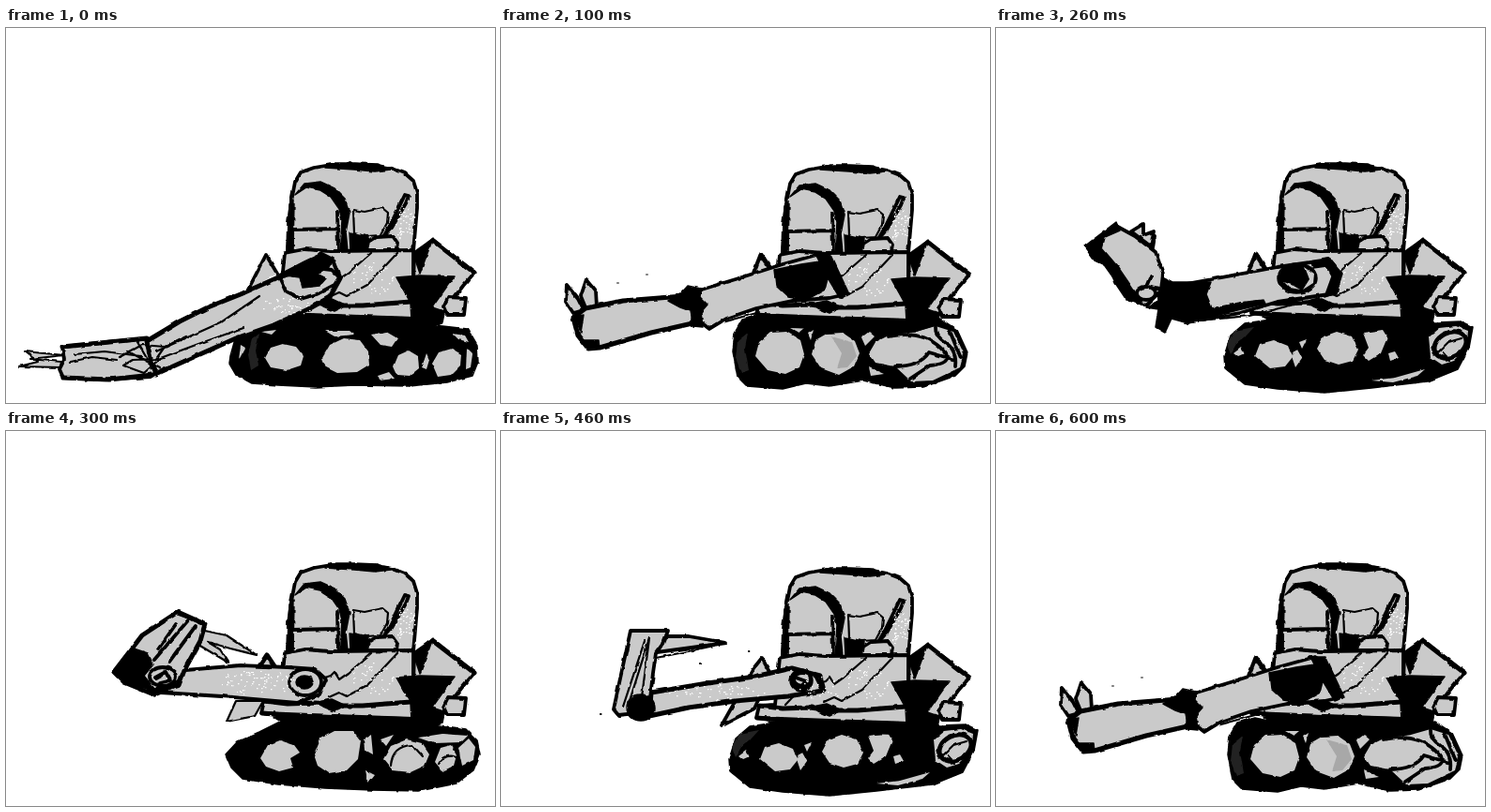
Write an HTML page that moves like this. It is 521 by 400 pixels and loops after 700 ms.

```html
<!DOCTYPE html>
<html lang="en">
<head>
<meta charset="utf-8">
<title>Excavator</title>
<style>
html, body { margin: 0; width: 100%; height: 100%; overflow: hidden; background: #fff; }
svg { display: block; width: 100vw; height: 100vh; }
path, ellipse { stroke: #000; stroke-width: 3.8; stroke-linejoin: round; stroke-linecap: round; fill: none; }
.metal { fill: #cacaca; }
.ink { fill: #000; stroke-width: 1.5; }
.patch { fill: #cacaca; stroke: none; }
.dark { fill: #222; stroke: none; }
.thin { stroke-width: 2.2; }
.bold { stroke-width: 5; }
.specks { fill: #fff; stroke: none; }
</style>
</head>
<body>
<svg viewBox="0 0 521 400">
<filter id="rough" filterUnits="userSpaceOnUse" x="0" y="0" width="521" height="400" color-interpolation-filters="sRGB">
  <feTurbulence type="fractalNoise" baseFrequency=".1" numOctaves="2" seed="4"/>
  <feDisplacementMap in="SourceGraphic" scale="3" xChannelSelector="R" yChannelSelector="G"/>
</filter>
<g filter="url(#rough)">

<g class="track">
  <path class="ink" d="M239 350L244 332 256 320 280 314 430 314 492 321 502 338 503 356 497 371 470 378 430 382 372 381 330 383 290 381 262 379 245 370 238 358Z"/>
  <path class="patch" d="M276 352L282 341 295 337 309 340 317 350 314 360 299 365 282 362Z"/>
  <path class="patch" d="M337 352L345 338 360 331 377 333 386 345 387 359 374 367 353 368 341 362Z"/>
  <path class="patch" d="M413 361L418 349 429 344 439 350 440 363 430 371 417 370Z"/>
  <path class="patch" d="M454 358L461 346 475 342 485 348 484 360 474 370 460 372Z"/>
  <path class="patch" d="M340 323L366 323 371 327 350 329ZM389 327L405 324 417 331 411 340 399 338ZM448 347L451 354 448 364 443 362ZM491 342L497 348 495 362 490 364ZM476 326L489 328 493 335 482 332ZM250 338L255 341 248 354Z"/>
  <path class="patch" d="M272 324L288 322 283 327ZM396 371L408 367 414 374 398 376Z"/>
  <path class="dark" d="M262 332L270 326 266 343 269 360 261 365 258 348Z"/>
</g>

<g class="track">
  <path class="ink" d="M247 345L249 325 257 311 276 306 300 311 440 314 468 310 486 322 497 346 494 361 484 371 450 383 420 384 386 376 350 382 325 379 300 385 262 382 252 372Z"/>
  <path class="patch" d="M271 350L275 335 287 325 304 324 319 333 323 348 318 362 303 369 284 365Z"/>
  <path class="patch" d="M331 348L335 333 347 326 364 325 377 334 382 347 376 361 360 370 341 363Z"/>
  <path class="dark" opacity=".2" d="M352 329L374 335 379 350 369 362 358 363 363 347Z"/>
  <path class="patch" d="M392 347L399 335 413 328 442 324 463 318 482 324 493 347 489 362 460 376 437 377 420 361 399 357Z"/>
  <path class="patch" d="M308 320L323 320 317 325ZM327 326L333 322 330 333ZM384 330L392 324 398 329 388 339ZM392 362L408 369 394 371Z"/>
  <path d="M413 329Q447 322 467 340T457 360L436 374M420 361Q446 361 456 346L484 354M463 319Q462 328 474 336T484 361M478 323L490 352"/>
  <path class="dark" d="M252 334L263 325 260 342 264 365 256 368 250 352Z"/>
</g>

<g class="track">
  <path class="ink" d="M243 350L250 328 265 315 300 310 430 314 470 314 495 313 508 319 504 341 492 364 460 377 400 384 350 389 300 385 265 380 244 363Z"/>
  <path class="patch" d="M276 350L281 337 296 333 311 339 316 351 308 361 292 363Z"/>
  <path class="patch" d="M342 342L349 329 363 324 379 329 386 343 380 355 365 359 350 354Z"/>
  <path class="patch" d="M391 325L412 322 417 330 410 347 397 355 391 349 397 341ZM253 346L261 340 265 347 258 350ZM315 350L321 343 326 352 319 362ZM323 335L331 332 326 342ZM418 347L425 345 429 352 420 355ZM400 376L425 373 457 364 449 371 423 378Z"/>
  <path class="patch" d="M461 329L472 320 490 318 503 323 501 342 488 355 475 359 463 351Z"/>
  <ellipse cx="484" cy="338" rx="18" ry="13" transform="rotate(-28 484 338)" class="bold"/>
  <path class="thin" d="M469 348L482 335 496 331M476 346L483 354"/>
  <path class="dark" d="M246 337L254 323 275 319 265 330 256 337 250 348Z"/>
</g>

<g class="track">
  <path class="ink" d="M234 345L247 331 270 321 296 308 440 311 490 318 502 330 505 345 498 362 480 376 440 384 390 383 340 381 290 377 252 371 240 359Z"/>
  <path class="patch" d="M271 349L279 335 292 330 307 335 313 343 303 349 306 359 291 363 277 358Z"/>
  <path class="patch" d="M328 345L335 328 350 320 370 320 378 330 375 350 363 362 344 365 332 357Z"/>
  <path class="patch" d="M402 350L410 336 427 329 443 333 451 345 446 357 431 364 412 362Z"/>
  <path class="patch" d="M457 353L463 338 474 335 480 346 477 357 465 363ZM482 338L493 328 500 337 498 351 486 357ZM439 327L465 323 492 325 485 332 456 333ZM381 329L389 324 391 345 382 340ZM383 362L393 367 386 376ZM399 329L413 324 405 336Z"/>
  <path class="thin" d="M410 357Q411 336 433 335L444 347M461 355Q468 343 480 348"/>
</g>

<g id="body">
  <path class="ink" d="M285 308L440 311 467 304 465 314 440 322 300 317Z"/>
  <path class="metal" d="M300 238L301 208 304 185 308 164 314 154 328 149 346 146 370 146 397 147 412 150 425 155 434 163 438 176 438 192 436 215 434 238Z"/>
  <path class="ink" d="M340 149L352 144 372 144 395 145 410 151 393 153 371 151Z"/>
  <path class="ink" d="M308 178L318 166 335 164 350 171 361 182 366 197 362 218 364 238 356 238 358 205 355 193 346 180 335 173 320 170ZM302 188L307 183 306 238 299 238Z"/>
  <path d="M305 215L353 214M353 196L354 238"/>
  <path class="ink" d="M366 219L386 222 385 238 367 238Z"/>
  <path class="metal thin" d="M370 194L382 196 401 192 407 197 406 208 399 221 384 222 371 219Z"/>
  <path class="metal" d="M425 178L429 179 426 187 411 213 402 223 409 211Z"/>
  <path class="metal" d="M384 237L386 228 394 223 412 222 417 229 416 237Z"/>
  <path class="metal" d="M297 240L318 236 345 238 434 237 434 310 350 307 272 304 275 291 292 290Z"/>
  <path class="bold" d="M275 291L300 294 330 293 350 296 380 296 431 292M273 304L310 307 440 311"/>
  <path class="ink" d="M332 292L347 289 362 296 350 302 338 297Z"/>
  <path class="thin" d="M303 290L320 272 346 264 350 260 355 268 365 261 389 240M344 287L355 282 363 286 385 274 417 240"/>
  <path class="metal" d="M435 240L455 226 499 261 487 275 465 304 442 316 433 310Z"/>
  <path class="ink" d="M434 241L455 224 441 262ZM416 266L441 264 478 265 471 274 454 298 469 303 442 317 432 312 431 293Z"/>
  <path class="bold" d="M455 227L499 261"/>
  <path class="metal" d="M471 287L490 288 488 306 470 306 466 297Z"/>
  <path class="specks" data-specks="424 209 11 18 45"/>
  <path class="specks" data-specks="388 267 24 18 45"/>
</g>

<g class="arm">
  <path class="metal" d="M258 279L277 242 289 262"/>
  <path class="metal thin" d="M14 361L34 356 20 345 62 349 26 353 59 356 58 362Z"/>
  <path class="metal" d="M60 340L100 336 150 331 162 345 164 364 154 372 100 375 61 373 57 364 62 354Z"/>
  <path class="bold" d="M60 340L100 336 150 331M61 373L110 375 156 370"/>
  <path class="metal bold" d="M150 334L185 313 215 298 250 284 290 266 330 247 349 249 356 267 345 287 322 300 285 317 245 331 200 351 160 369 154 352Z"/>
  <path class="thin" d="M160 345L229 314 270 286M162 353L205 337 253 320M167 341L192 329M121 351L145 338 169 340 160 353 135 354 125 360 147 368 165 352M69 356L92 351 118 354M73 348L105 345 144 350M130 345L164 363M140 335L158 366"/>
  <path class="metal" d="M291 266L298 281 314 289 331 284 350 274 355 266 347 258 330 256Z"/>
  <path class="ink" d="M291 263L318 249 337 240 349 246 344 255 331 262 341 267 334 275 316 277 313 266Z"/>
  <path class="specks" data-specks="300 296 30 9 40"/>
</g>

<g class="arm">
  <path class="metal bold" d="M270 260L277 242 288 258"/>
  <path class="metal" d="M77 304L69 292 70 274 82 289 88 301ZM85 286L91 268 101 280 102 298 90 298Z"/>
  <path class="metal" d="M207 281L250 268 300 252 340 241 353 249 368 284 350 288 310 291 272 299 240 310 222 321 207 309Z"/>
  <path class="metal bold" d="M77 309L90 299 130 291 194 286 207 299 204 315 160 325 105 341 93 342 82 328Z"/>
  <path class="ink" d="M178 291L190 285 199 275 213 278 212 287 220 295 213 303 215 319 205 318 202 302 191 298ZM88 333L104 333 105 342 92 343ZM79 308L88 306 85 325Z"/>
  <path class="ink" d="M291 258L320 252 340 249 349 263 345 279 325 290 306 287 293 275ZM335 241L351 241 371 284 361 288 349 268Z"/>
  <path class="thin" d="M235 314L276 303"/>
  <path class="thin" d="M125 272L126 272M155 263L156 263" stroke-opacity=".5"/>
</g>

<g class="arm">
  <path class="metal bold" d="M270 258L277 241 287 257"/>
  <path class="metal" d="M180 277L230 268 300 255 355 247 367 261 362 283 300 292 260 304 205 314 176 303Z"/>
  <path class="ink" d="M170 262L188 271 229 271 224 284 230 299 260 293 285 290 287 294 245 304 205 315 187 310 180 325 170 319 173 300 160 298 173 291Z"/>
  <path class="ink" d="M336 250L357 247 369 262 362 283 350 287 358 265 352 254 338 256Z"/>
  <ellipse class="ink" cx="321" cy="267" rx="21" ry="16"/>
  <path class="patch" d="M329 255L339 262 338 272 327 279 334 268ZM307 271L313 277 324 279 317 275Z"/>
  <path class="metal" d="M144 217L157 209 157 221 168 217 165 233Z"/>
  <path class="metal" d="M97 234L128 211 148 222 170 239 178 262 176 280 160 296 143 289 129 270 116 252Z"/>
  <path class="ink" d="M94 233L128 207 132 216 116 223 113 235 130 255 143 274 155 292 139 290 127 272 120 255 105 248Z"/>
  <ellipse class="metal" cx="160" cy="283" rx="10" ry="7"/>
  <path d="M165 264L160 276 176 279M169 222L167 235"/>
  <path class="thin" d="M205 313L270 307 345 288"/>
</g>

<g class="arm">
  <path class="metal bold" d="M270 251L278 239 286 251"/>
  <path class="metal thin" d="M235 310L245 288 274 288 265 304Z"/>
  <path class="metal" d="M165 279L180 256 250 250 300 252 329 254 341 265 334 281 310 290 230 283Z"/>
  <ellipse class="metal" cx="319" cy="268" rx="17" ry="14" stroke-width="6"/>
  <ellipse class="ink" cx="318" cy="268" rx="9" ry="7"/>
  <path class="metal thin" d="M207 212L235 218 267 239 239 232 215 225 228 233 237 247 205 228Z"/>
  <path class="metal bold" d="M115 257L145 218 183 193 212 206 207 224 190 255 184 271 155 280 126 268Z"/>
  <path class="ink" d="M114 257L136 232 151 237 157 249 147 261 158 275 184 266 177 275 158 283 151 275 126 268Z"/>
  <path d="M194 202L158 244M202 208L174 246M181 206L162 233"/>
  <path d="M181 194L203 202" stroke-width="6"/>
  <ellipse class="metal" cx="167" cy="262" rx="14" ry="10"/>
  <path d="M159 263L170 257 175 266 163 269"/>
  <path class="specks" data-specks="267 268 42 13 75"/>
</g>

<g class="arm">
  <path class="metal" d="M235 314L270 252 278 242 287 259 270 296Z"/>
  <path class="metal bold" d="M160 279L220 269 270 262 310 253 340 261 344 277 305 283 250 288 200 295 158 304Z"/>
  <ellipse class="ink" cx="320" cy="266" rx="12" ry="12"/>
  <ellipse class="patch" cx="321" cy="265" rx="7" ry="5"/>
  <path d="M314 263L325 267 320 272M334 259L343 277"/>
  <path class="thin" d="M165 242L195 236 227 229"/>
  <path class="metal" d="M170 219L200 219 240 226 166 236Z"/>
  <path class="metal" d="M138 213L178 213 173 226 165 237 162 258 159 284 145 301 125 303 120 297 130 250Z"/>
  <path class="thin" d="M158 221L137 288M153 224L130 294M158 221L150 284"/>
  <ellipse class="ink" cx="149" cy="295" rx="15" ry="14"/>
  <path class="thin" d="M212 248L212.5 248M106 302L106.5 302M264 235L264.3 235"/>
  <path class="specks" data-specks="230 279 55 8 45"/>
  <path class="specks" data-specks="340 274 24 14 25"/>
</g>

</g>
</svg>
<script>
const STEP = 100;
// One pose per step: arm drawing, track drawing, vertical bounce of the body.
const poses = [
  { arm: 0, track: 0, bounce: 0 },
  { arm: 1, track: 1, bounce: 2 },
  { arm: 2, track: 2, bounce: 0 },
  { arm: 3, track: 3, bounce: -3 },
  { arm: 4, track: 2, bounce: 2 },
  { arm: 2, track: 1, bounce: 1 },
  { arm: 1, track: 1, bounce: -3 }
];
const arms = document.querySelectorAll('.arm');
const tracks = document.querySelectorAll('.track');
const body = document.getElementById('body');

let seed = 7;
function random() {
  seed = (seed * 16807) % 2147483647;
  return seed / 2147483647;
}

// Scatter small white flecks inside an ellipse.
for (const path of document.querySelectorAll('[data-specks]')) {
  const [cx, cy, rx, ry, count] = path.dataset.specks.split(' ').map(Number);
  let d = '';
  for (let i = 0; i < count; i++) {
    const angle = random() * Math.PI * 2;
    const radius = Math.sqrt(random());
    const x = Math.round(cx + rx * radius * Math.cos(angle));
    const y = Math.round(cy + ry * radius * Math.sin(angle));
    d += `M${x} ${y}h1.5v1.3h-1.5z`;
  }
  path.setAttribute('d', d);
}

function showOnly(groups, index) {
  groups.forEach((group, i) => group.style.display = i === index ? '' : 'none');
}

function draw(time) {
  const pose = poses[Math.floor(time / STEP) % poses.length];
  showOnly(arms, pose.arm);
  showOnly(tracks, pose.track);
  body.setAttribute('transform', `translate(0 ${pose.bounce})`);
}

const start = performance.now();
function tick() {
  draw(performance.now() - start);
  requestAnimationFrame(tick);
}
tick();
</script>
</body>
</html>
```
